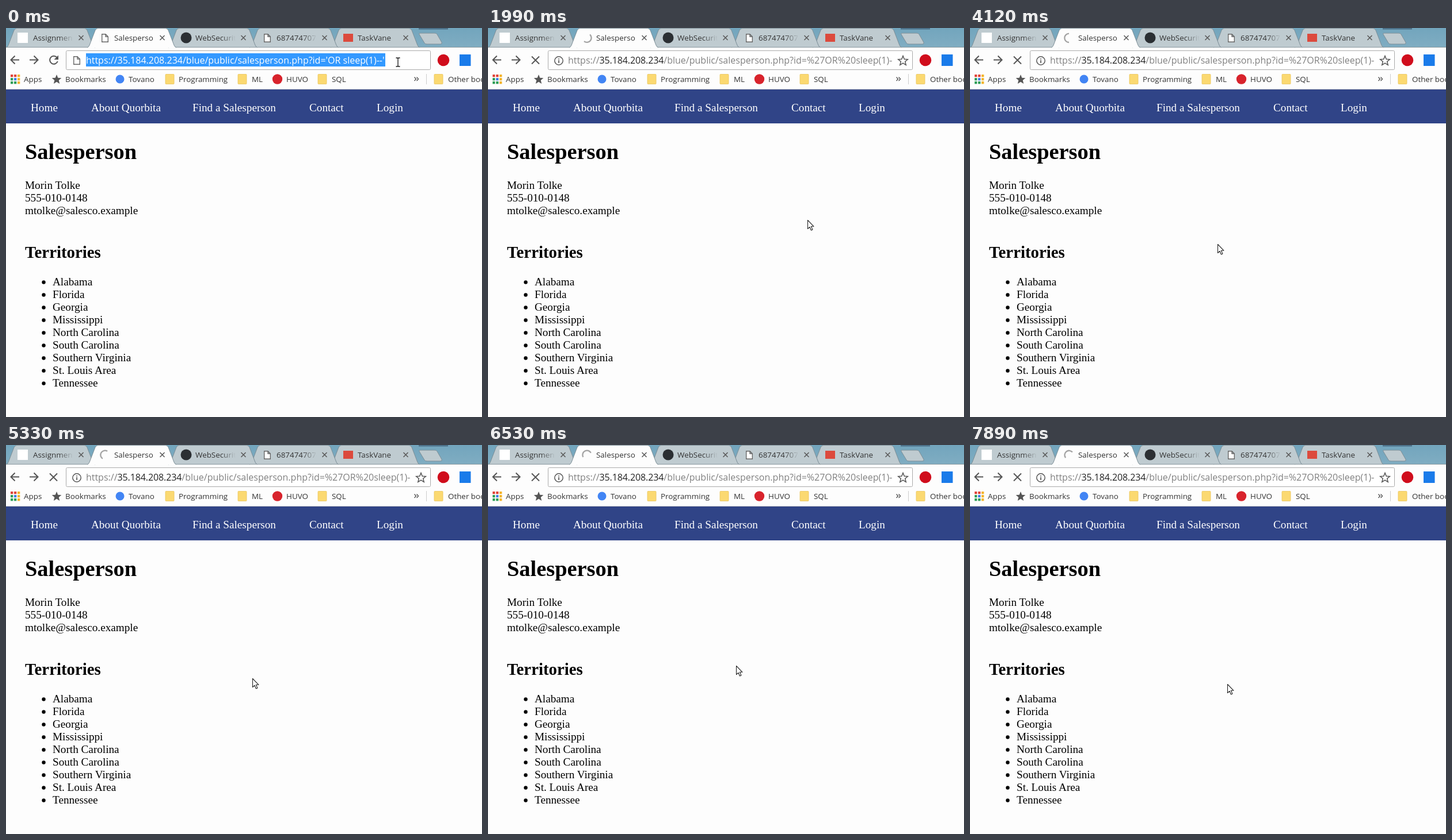
Write an HTML page that moves like this. It is 827 px wide and 677 px high and loops after 8 s.

```html
<!DOCTYPE html>
<html lang="en">
<head>
<meta charset="utf-8">
<title>Salesperson</title>
<style>
  html, body { margin: 0; width: 100%; height: 100%; overflow: hidden; background: #fdfdfd; }
  svg { display: block; }
  text { white-space: pre; }
  .ui { font-family: "Open Sans", "Noto Sans", sans-serif; font-size: 13.4px; fill: #333; }
  .url { font-size: 16px; }
  .host { fill: #222; letter-spacing: -.12px; }
  .page { font-family: "Liberation Serif", "Times New Roman", serif; font-size: 19.2px; fill: #000; }
  .line { fill: none; stroke: #555; stroke-width: 2; }
</style>
</head>
<body>
<svg id="stage" width="827" height="677" viewBox="0 0 827 677">
  <defs>
    <linearGradient id="strip" x2="0" y2="1">
      <stop stop-color="#72a5bd"/><stop offset="1" stop-color="#80adc2"/>
    </linearGradient>
    <path id="doc" d="M.7.7H7L11.3 5V14.3H.7ZM7 .7V5H11.3" fill="#fff" stroke="#666" stroke-width="1.4"/>
    <path id="folder" d="M1 0H14Q15 0 15 1V16Q15 17 14 17H1Q0 17 0 16V1Q0 0 1 0Z" fill="#fbd971" stroke="#eac55c" stroke-width=".8"/>
    <path id="star" d="M0 -8.5L2.3 -2.8L8.3 -2.4L3.7 1.5L5.2 7.4L0 4.2L-5.2 7.4L-3.7 1.5L-8.3 -2.4L-2.3 -2.8Z"/>
  </defs>

  <rect width="827" height="677" fill="#fdfdfd"/>
  <rect width="827" height="34" fill="url(#strip)"/>
  <rect x="717" width="51" height="2.5" fill="#4d7189"/>
  <g id="tabs"></g>

  <g id="toolbar">
    <path class="line" d="M23 55.5H9M15.5 48.5L8.5 55.5L15.5 62.5M41 55.5H55M48.5 48.5L55.5 55.5L48.5 62.5"/>
    <rect x="104.5" y="39.5" width="633" height="33" rx="2" fill="#fff" stroke="#aaa"/>
    <circle cx="760" cy="56" r="10.3" fill="#d00d1c"/>
    <rect x="788" y="46" width="19.5" height="20" fill="#1a7bea"/>
  </g>

  <g id="idle">
    <path class="line" d="M88.3 51A7 7 0 1 0 89.7 58"/>
    <path d="M91 47.5V55H83.5Z" fill="#555"/>
    <use href="#doc" x="117" y="49"/>
    <use href="#doc" x="166" y="10"/>
    <rect x="139" y="44" width="520" height="23" fill="#3399ff"/>
    <text class="ui url" x="139" y="62" style="fill:#fff">https://35.184.208.234/blue/public/salesperson.php?id='OR sleep(1)--'</text>
  </g>

  <g id="busy">
    <path class="line" d="M76 49.5L89 62.5M89 49.5L76 62.5"/>
    <circle class="line" cx="123" cy="57" r="7.2" style="stroke-width:1.5"/>
    <path d="M122.2 56H123.9V61H122.2ZM122.2 53H123.9V54.7H122.2Z" fill="#555"/>
    <text class="ui url" x="139" y="62" style="fill:#808080">https://<tspan class="host">35.184.208.234</tspan>/blue/public/salesperson.php?id=%27OR%20sleep(1)-</text>
    <use href="#star" x="721" y="57" fill="none" stroke="#555" stroke-width="1.5"/>
    <path id="spinner" fill="none" stroke="#a3a3a3" stroke-width="2.3"/>
  </g>

  <g id="bookmarks"></g>
  <rect y="106" width="827" height="1" fill="#d0d0d0"/>
  <rect y="107" width="827" height="59" fill="#304487"/>
  <g id="page"></g>

  <path id="beam" transform="translate(681 59.5)" d="M-3.5 -7.5H-1L0 -6.5L1 -7.5H3.5M0 -6.5V6.5M-3.5 7.5H-1L0 6.5L1 7.5H3.5" fill="none" stroke="#111" stroke-width="1.3"/>
  <path id="arrow" d="M.5 .5V15.5L3.9 12.3L6.4 18L8.9 17L6.4 11.3H11Z" fill="#fff" stroke="#222" stroke-width="1.1" stroke-linejoin="round"/>
</svg>
<script>
const $ = id => document.getElementById(id);
const text = (x, y, s, cls, style = '') => `<text class="${cls}" x="${x}" y="${y}" style="${style}">${s}</text>`;
const dot = (x, y, r, fill) => `<circle cx="${x}" cy="${y}" r="${r}" fill="${fill}"/>`;
const box = (x, y, w, h, fill) => `<rect x="${x}" y="${y}" width="${w}" height="${h}" fill="${fill}"/>`;
const use = (id, x, y) => `<use href="#${id}" x="${x}" y="${y}"/>`;

// Tab strip
const TAB = 141;
const tabs = [
  ['Assignment', box(20, 8, 18, 18, '#fff')],
  ['Salesperso', ''],
  ['WebSecurity', dot(313, 17, 9.5, '#2b2f33')],
  ['6874747074', use('doc', 448, 10)],
  ['TaskVane', box(586, 10, 17, 14, '#dc4a3d')],
];

function tab(i) {
  const [label, icon] = tabs[i];
  const x = i * TAB, active = i === 1;
  const shape = `M${x} 34Q${x + 2.5} 33.5 ${x + 4} 30L${x + 14} 4Q${x + 15.5} .5 ${x + 19} .5` +
    `H${x + 136}Q${x + 139.5} .5 ${x + 141} 4L${x + 151} 30Q${x + 152.5} 33.5 ${x + 155} 34`;
  const fade = `<linearGradient id="fade${i}" gradientUnits="userSpaceOnUse" x1="${x + 92}" x2="${x + 117}" y1="0" y2="0">` +
    `<stop stop-color="#333"/><stop offset="1" stop-color="#333" stop-opacity="0"/></linearGradient>`;
  const fill = label.length > 8 && !active ? `fill:url(#fade${i})` : '';
  return fade +
    `<path d="${shape}" fill="${active ? '#fdfdfd' : '#bfcbd0'}" stroke="#7c8e97"/>` + icon +
    text(x + 47, 22, label, 'ui', fill) +
    `<path d="M${x + 126.5} 13L${x + 134.5} 21M${x + 134.5} 13L${x + 126.5} 21" stroke="#5a5a5a" stroke-width="1.6"/>`;
}

$('tabs').innerHTML =
  '<path d="M719 9H745Q748 9 749 11L757 25Q758 28 755 28H731Q728 28 727 26L718 11Q717 9 719 9Z" fill="#bfcbd0" stroke="#7c8e97"/>' +
  [4, 3, 2, 0].map(tab).join('') + box(0, 33, 827, 1, '#8a999f') + tab(1);

// Bookmarks bar
const [R, Y, G, B] = ['#e0453a', '#f3b52c', '#2f9e58', '#3f7fe8'];
const apps = [R, R, Y, G, B, Y, G, G, Y]
  .map((c, i) => box(8 + i % 3 * 6, 81 + Math.floor(i / 3) * 6, 4.3, 4.3, c)).join('');
const labels = [[31, 'Apps'], [103, 'Bookmarks'], [213, 'Tovano'], [300, 'Programming'], [427, 'ML'],
  [487, 'HUVO'], [566, 'SQL'], [768, 'Other bookmarks']];
$('bookmarks').innerHTML = apps +
  '<use href="#star" x="88" y="89.5" fill="#555"/>' +
  dot(198, 89, 7.5, '#4285f4') + dot(471.5, 89, 8.7, '#d8232c') +
  [277, 403, 542, 744].map(x => use('folder', x, 80.5)).join('') +
  labels.map(([x, s]) => text(x, 94, s, 'ui')).join('') +
  '<path d="M709.5 85.5L712.5 88.7L709.5 92M713.5 85.5L716.5 88.7L713.5 92" class="line" style="stroke-width:1.4"/>' +
  box(730, 80, 1, 18, '#ccc');

// Page content
const nav = [[43, 'Home'], [148, 'About Quorbita'], [324, 'Find a Salesperson'], [527, 'Contact'], [644, 'Login']];
const person = ['Morin Tolke', '555-010-0148', 'mtolke@salesco.example'];
const areas = ['Alabama', 'Florida', 'Georgia', 'Mississippi', 'North Carolina', 'South Carolina',
  'Southern Virginia', 'St. Louis Area', 'Tennessee'];
$('page').innerHTML =
  nav.map(([x, s]) => text(x, 145, s, 'page', 'fill:#fff')).join('') +
  text(33, 228, 'Salesperson', 'page', 'font-weight:bold;font-size:38.4px') +
  person.map((s, i) => text(33, 280 + 22 * i, s, 'page')).join('') +
  text(33, 400, 'Territories', 'page', 'font-weight:bold;font-size:28.8px') +
  areas.map((s, i) => dot(65.5, 442.5 + 22 * i, 3.2, '#000') + text(81, 448 + 22 * i, s, 'page')).join('');

// Motion
const LOOP = 8000, START = 930;
const beats = [START, 1990, 3050, 4120, 5170, 6230, 7290, 8350];  // seven picture steps between beats
const path = [  // time, x, y of the pointer tip
  [1240, 640, 150], [1390, 580, 279], [1690, 555, 334], [1990, 555, 334], [2290, 525, 420],
  [2590, 528, 463], [2900, 542, 400], [3050, 470, 360], [3200, 393, 347], [3510, 405, 471],
  [3970, 431, 378], [4570, 425, 370], [5020, 432, 381], [5320, 428, 406], [5770, 441, 404],
  [6230, 439, 399], [6530, 431, 384], [7140, 436, 396], [7590, 445, 420], [7890, 447, 416]];

// Source times are rounded to 10 ms, so a step may begin slightly early
function snap(t) {
  const i = beats.findIndex((b, k) => t < beats[k + 1]);
  const step = (beats[i + 1] - beats[i]) / 7;
  return beats[i] + Math.floor((t - beats[i] + 8) / step) * step;
}

function pointer(t) {
  const k = path.findIndex(p => p[0] > t);
  if (k < 0) return path[path.length - 1].slice(1);
  if (k === 0) return path[0].slice(1);
  const [t0, x0, y0] = path[k - 1], [t1, x1, y1] = path[k];
  const u = (t - t0) / (t1 - t0);
  return [x0 + (x1 - x0) * u, y0 + (y1 - y0) * u].map(Math.round);
}

// Counter-clockwise arc: grows to a half turn, then keeps its length
function arc(elapsed) {
  const end = 90 + 360 * elapsed / 1320;
  const from = Math.max(end - 180, 90);
  const at = a => {
    const r = a * Math.PI / 180;
    return `${(172 + 7.7 * Math.cos(r)).toFixed(2)} ${(17.3 - 7.7 * Math.sin(r)).toFixed(2)}`;
  };
  return `M${at(from)}A7.7 7.7 0 0 0 ${at(end)}`;
}

const show = (id, on) => { $(id).style.display = on ? '' : 'none'; };

function draw(time) {
  const t = time % LOOP, busy = t >= START;
  const q = busy ? snap(t) : 0;
  const moved = q > 1200;
  show('idle', !busy);
  show('busy', busy);
  show('beam', !moved);
  show('arrow', moved);
  if (busy) $('spinner').setAttribute('d', arc(q - START + 110));
  if (moved) $('arrow').setAttribute('transform', `translate(${pointer(q).join(' ')})`);
}

const t0 = performance.now();
function tick() {
  draw(performance.now() - t0);
  requestAnimationFrame(tick);
}
tick();
</script>
</body>
</html>
```
